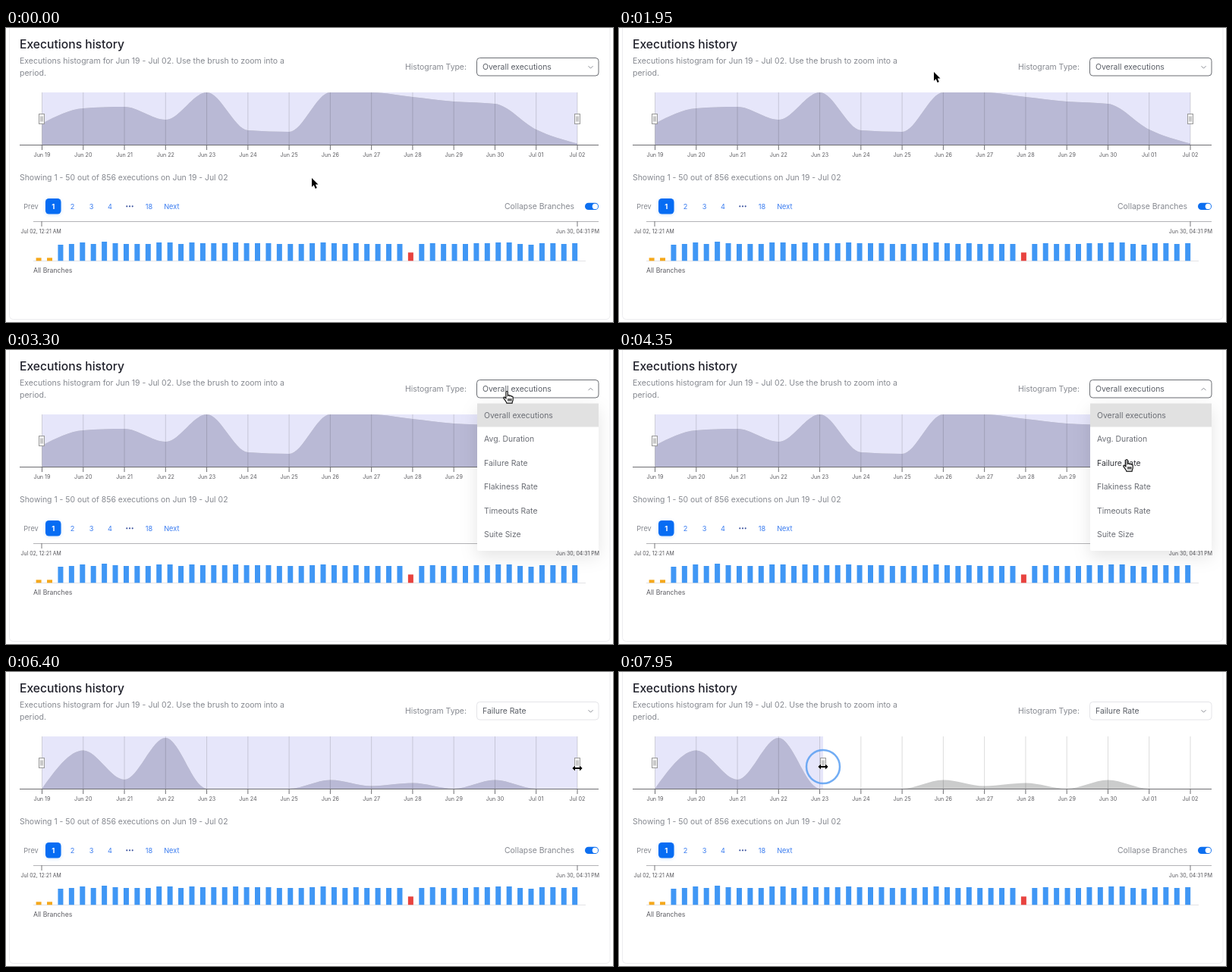
Recreate the animation shown at these times as an HTML page. Size 800 px wide and 388 px high, loop 8000 ms.

```html
<!DOCTYPE html>
<html lang="en">
<head>
<meta charset="utf-8">
<title>Executions history</title>
<style>
  html, body { margin: 0; width: 100%; height: 100%; overflow: hidden; background: #fff; }
  svg { display: block; width: 800px; height: 388px; font-family: Inter, sans-serif; }
</style>
</head>
<body>
<svg id="stage" viewBox="0 0 800 388" xmlns="http://www.w3.org/2000/svg"></svg>
<script>
const LOOP = 8000;
const LEFT = 47.5, RIGHT = 753, TOP = 85, AXIS = 154.5;
const STEP = (RIGHT - LEFT) / 13;
const BODY = 10.43;
const GRAY = '#868990', BLUE = '#3b7df0';
const OPEN_AT = 2950, PICK_AT = 4700, PRESS_AT = 6400;
const DRAG_START = 6690, DRAG_TIME = 1000;

const days = [...Array(14)].map((_, i) => i < 12 ? 'Jun ' + (19 + i) : 'Jul 0' + (i - 11));
const options = ['Overall executions', 'Avg. Duration', 'Failure Rate', 'Flakiness Rate', 'Timeouts Rate', 'Suite Size'];
const overall = [126, 106, 104, 121, 85, 135, 137, 85, 85, 91, 97, 100, 134, 152.5];
const failures = [154, 103.5, 142, 87, 154, 154, 154, 142.5, 150.5, 146.5, 154, 142.5, 154, 154];
const runLengths = '00346475444664655565554445654544440454445566435545';

const text = (x, y, size, str, fill = GRAY, extra = '') =>
  `<text x="${x}" y="${y}" font-size="${size}" fill="${fill}" ${extra}>${str}</text>`;
const rect = (x, y, w, h, fill, extra = '') =>
  `<rect x="${x}" y="${y}" width="${w}" height="${h}" fill="${fill}" ${extra}/>`;
const line = (x1, y1, x2, y2, stroke, extra = '') =>
  `<path d="M${x1} ${y1}L${x2} ${y2}" stroke="${stroke}" ${extra}/>`;
const middle = 'text-anchor="middle"';

// Monotone cubic through evenly spaced points, closed along the axis
function areaPath(ys) {
  const n = ys.length, slope = ys.slice(1).map((y, i) => (y - ys[i]) / STEP);
  const tangent = ys.map((_, i) => {
    if (i === 0 || i === n - 1) return 0;
    const a = slope[i - 1], b = slope[i];
    return (Math.sign(a) + Math.sign(b)) * Math.min(Math.abs(a), Math.abs(b), Math.abs(a + b) / 4);
  });
  tangent[0] = (3 * slope[0] - tangent[1]) / 2;
  tangent[n - 1] = (3 * slope[n - 2] - tangent[n - 2]) / 2;
  let d = `M${LEFT} ${AXIS}V${ys[0]}`;
  for (let i = 1; i < n; i++) {
    const x = LEFT + i * STEP, third = STEP / 3;
    d += `C${x - 2 * third} ${ys[i - 1] + tangent[i - 1] * third} ${x - third} ${ys[i] - tangent[i] * third} ${x} ${ys[i]}`;
  }
  return d + `V${AXIS}Z`;
}

function header() {
  return rect(4.5, -10, 791.5, 394.5, '#fff', 'rx="5" stroke="#ececef"') +
    text(18, 26.5, 15.67, 'Executions history', '#20212b', 'font-weight="500"') +
    text(18, 47, 10.52, 'Executions histogram for Jun 19 - Jul 02. Use the brush to zoom into a') +
    text(18, 62.5, 10.52, 'period.') +
    text(526, 55.2, BODY, 'Histogram Type:') +
    `<rect id="select" x="620.5" y="39.5" width="160.5" height="23.5" rx="4" fill="#fff"/>` +
    `<text id="choice" x="628" y="55.2" font-size="${BODY}" fill="#5b5f67"></text>` +
    `<path id="chevron" d="M-3 -1.5L0 1.5L3 -1.5" fill="none" stroke="#8a8d94"/>`;
}

function histogram() {
  const handle = id => `<g id="${id}">` + rect(-3.5, 113.5, 7, 13, '#f4f4f4', 'stroke="#9a9a9a"') +
    line(-1, 116.5, -1, 123.5, '#888', 'stroke-width=".8"') +
    line(1, 116.5, 1, 123.5, '#888', 'stroke-width=".8"') + '</g>';
  const xs = days.map((_, i) => LEFT + i * STEP);
  return `<clipPath id="brush"><rect class="span" x="${LEFT}" y="${TOP - 1}" height="71"/></clipPath>` +
    `<rect class="span" x="${LEFT}" y="${TOP}" height="${AXIS - TOP}" fill="#e6e6fa"/>` +
    `<path class="area" fill="#cbcccc"/><path class="area" fill="#b9b9d5" clip-path="url(#brush)"/>` +
    xs.map(x => line(x, TOP, x, AXIS, '#000', 'stroke-opacity=".14"')).join('') +
    line(18, AXIS, 781, AXIS, '#6e6e72') +
    xs.map((x, i) => line(x, AXIS, x, 161, '#6e6e72') + text(x, 170, 7.15, days[i], '#5c5c60', middle)).join('') +
    handle('leftHandle') + handle('rightHandle');
}

function pager() {
  const pages = [[87.5, '2'], [112.5, '3'], [137, '4'], [188.5, '18'], [218.3, 'Next']];
  return text(18, 200.8, BODY, 'Showing 1 - 50 out of 856 executions on Jun 19 - Jul 02') +
    text(33, 238.6, 9.2, 'Prev', GRAY, middle) +
    rect(52, 225, 20.5, 20.5, '#066cf3', 'rx="4.5" style="filter:drop-shadow(0 1px 2px #066cf333)"') +
    text(62.3, 238.8, 9.5, '1', '#fff', middle + ' font-weight="700"') +
    pages.map(([x, label]) => text(x, 238.6, 9.2, label, BLUE, middle)).join('') +
    [159.3, 163, 166.7].map(x => `<circle cx="${x}" cy="235.3" r="1.1" fill="#3f55a0"/>`).join('') +
    text(657, 239, BODY, 'Collapse Branches') +
    rect(763, 230.7, 18, 9.4, '#0d6ff0', 'rx="4.7"') +
    '<circle cx="776.4" cy="235.4" r="3.7" fill="#fff"/>';
}

function runs() {
  const bar = (digit, i) => {
    const [h, color] = i < 2 ? [4, '#f5a81c'] : i === 34 ? [11, '#e8433f'] : [18.3 + +digit, '#4097f5'];
    return rect(39.6 + i * 14.42, 307.3 - h, 7, h, color);
  };
  return line(36, 255.5, 781, 255.5, '#b3b3b6') +
    line(47, 255, 47, 262, '#77777b') + line(753, 255, 753, 262, '#77777b') +
    text(19.5, 270.7, 6.95, 'Jul 02, 12:21 AM', '#55555a') +
    text(782, 270.7, 6.95, 'Jun 30, 04:31 PM', '#55555a', 'text-anchor="end"') +
    line(36, 307.5, 764, 307.5, '#e3e3e6') +
    [...runLengths].map(bar).join('') +
    text(36, 322.5, 8.7, 'All Branches', '#5c5c62');
}

function menu() {
  return '<g id="menu">' +
    rect(621, 70.5, 160, 194.5, '#fff', 'rx="2" style="filter:drop-shadow(0 8px 11px #0000001a)"') +
    rect(621, 70.5, 160, 31, '#e1e1e1') +
    options.map((o, i) => text(630, 89.7 + i * 31.5, BODY, o, '#6b6e75', 'class="option"')).join('') + '</g>';
}

function pointers() {
  const tip = 'l3.6 -3.6v2.5';
  const shapes = {
    arrow: '<path d="M0 0V11.8L2.7 9.3L4.7 14L6.8 13.1L4.8 8.5H8.5Z"/>',
    hand: '<path transform="translate(1.5 .5)" paint-order="normal" fill="#fff" stroke="#111" stroke-width="1.2" d="M-1.6 1.2C-1.6 -.4 .8 -.4 .8 1.2V5.6C1.4 4.7 3 4.9 3.2 6C4 5.3 5.4 5.7 5.6 6.8C6.5 6.4 7.7 6.9 7.7 8.2V11C7.7 12.7 6.6 13.5 6.6 15.6H-.6C-.9 13.3 -3.4 11.3 -4.6 9.1C-5.1 7.8 -3.7 7.2 -2.9 8L-1.6 9.3ZM1.4 9.6V13M3.3 9.6V13M5.2 9.6V13"/>',
    move: '<path d="M0 -6.6L2.6 -3.6H.8V-.8H3.6V-2.6L6.6 0L3.6 2.6V.8H.8V3.6H2.6L0 6.6L-2.6 3.6H-.8V.8H-3.6V2.6L-6.6 0L-3.6 -2.6V-.8H-.8V-3.6H-2.6Z"/>',
    resize: `<path d="M-6.6 0${tip}H3v-2.5L6.6 0L3 3.6V1.1H-3V3.6Z"/>`
  };
  return '<circle id="ring" r="22" fill="none" stroke="#5a9ff2" stroke-width="2.5" stroke-opacity=".85"/>' +
    '<g id="pointer" fill="#000" stroke="#fff" stroke-width=".9" paint-order="stroke">' +
    Object.entries(shapes).map(([name, shape]) => `<g data-kind="${name}">${shape}</g>`).join('') + '</g>';
}

const stage = document.getElementById('stage');
stage.innerHTML = header() + histogram() + pager() + runs() + menu() + pointers();

const $ = id => document.getElementById(id);
const all = selector => [...stage.querySelectorAll(selector)];
const spans = all('.span'), areas = all('.area'), optionTexts = all('.option'), kinds = all('[data-kind]');
const curves = { overall: areaPath(overall), failures: areaPath(failures) };
const at = (x, y) => `translate(${x} ${y})`;
const show = (el, on) => el.setAttribute('visibility', on ? 'visible' : 'hidden');
const ease = p => (p = Math.min(1, Math.max(0, p)), p * p * (3 - 2 * p));

// [start, end, x, y]: the pointer eases to each stop
const stops = [
  [0, 0, 403, 198], [700, 1800, 415, 58], [2050, 2800, 659, 54],
  [3450, 4250, 668, 144], [5350, 5900, 753, 127],
  [DRAG_START, DRAG_START + DRAG_TIME, 269, 125]
];
function pointerAt(t) {
  let [, , x, y] = stops[0];
  for (const [start, end, nx, ny] of stops.slice(1)) {
    const p = ease((t - start) / (end - start));
    x += (nx - x) * p;
    y += (ny - y) * p;
  }
  return [x, y];
}

function pointerKind(x, y, t, open) {
  if (t >= PRESS_AT) return 'resize';
  if (x > 621 && x < 781 && ((y > 40 && y < 63) || (open && y > 70 && y < 265))) return 'hand';
  if (y > TOP && y < AXIS) {
    if (Math.abs(x - RIGHT) < 4) return 'resize';
    if (x > LEFT && x < RIGHT) return 'move';
  }
  return 'arrow';
}

function draw(t) {
  const open = t >= OPEN_AT && t < PICK_AT, picked = t >= PICK_AT, pressed = t >= PRESS_AT;
  const [x, y] = pointerAt(t);
  const end = pressed ? pointerAt(t - 70)[0] : RIGHT;

  $('select').setAttribute('stroke', pressed ? '#e4e4e8' : '#6a6d73');
  $('choice').textContent = options[picked ? 2 : 0];
  $('chevron').setAttribute('transform', at(770.5, 51.7) + (open ? ' scale(1 -1)' : ''));
  areas.forEach(a => a.setAttribute('d', picked ? curves.failures : curves.overall));
  spans.forEach(s => s.setAttribute('width', end - LEFT));
  $('leftHandle').setAttribute('transform', at(LEFT - .5, 0));
  $('rightHandle').setAttribute('transform', at(end, 0));

  show($('menu'), open);
  const hovered = y > 70 ? Math.floor((y - 70) / 31.5) : -1;
  optionTexts.forEach((o, i) => o.setAttribute('fill', i === hovered ? '#33353b' : '#6b6e75'));

  const [ringX, ringY] = pointerAt(t - 35);
  $('ring').setAttribute('transform', at(ringX, ringY));
  $('ring').setAttribute('opacity', ease((t - PRESS_AT) / 150));

  const kind = pointerKind(x, y, t, open);
  $('pointer').setAttribute('transform', at(x, y));
  kinds.forEach(k => show(k, k.dataset.kind === kind));
}

const began = performance.now();
function tick() {
  draw((performance.now() - began) % LOOP);
  requestAnimationFrame(tick);
}
tick();
</script>
</body>
</html>
```
